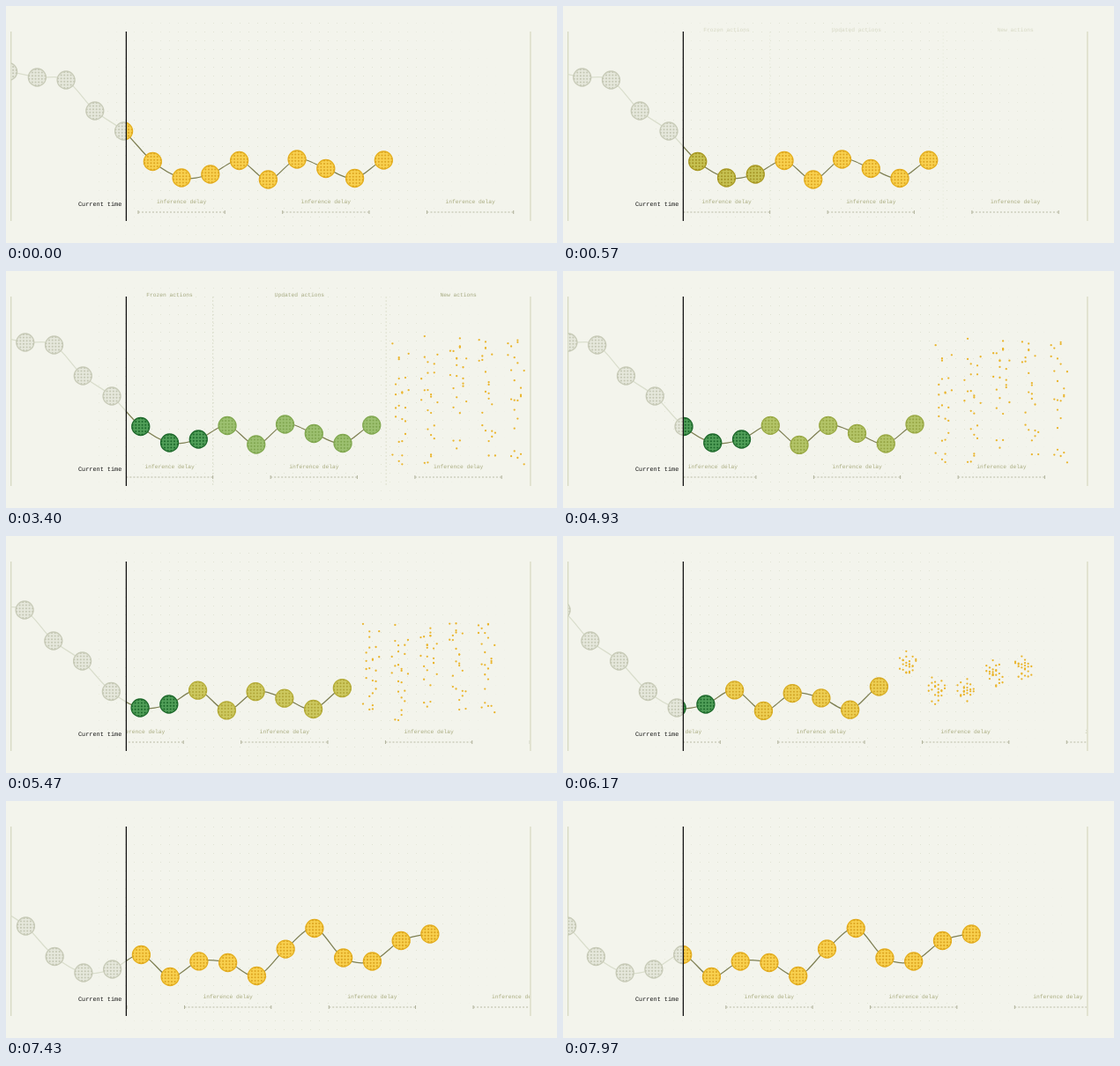
Animation of 625 by 269 pixels, one loop 8 s. Source, as an HTML page with a canvas:

```html
<!DOCTYPE html>
<html lang="en">
<head>
<meta charset="utf-8">
<title>Action chunk with inference delay</title>
<style>
  html, body { margin: 0; width: 100%; height: 100%; overflow: hidden; background: #f3f4ec; }
  canvas { display: block; }
</style>
</head>
<body>
<canvas id="stage" width="625" height="269"></canvas>
<script>
const ctx = document.getElementById('stage').getContext('2d');
const LOOP = 8000, PAUSE = 415, RESUME = 4450;
const LEFT = 5.7, NOW = 136.4, RIGHT = 594.9, TOP = 29, BOTTOM = 244;
const STEP = (RIGHT - NOW) / 14, RADIUS = 10, PITCH = 3.65;
const FONT = '"Liberation Mono", monospace';

// fill, outline, inner dots
const GREY = [[229, 231, 219], [201, 204, 185], [196, 199, 180]];
const YELLOW = [[248, 208, 79], [229, 176, 32], [222, 166, 34]];
const DARK = [[80, 158, 88], [32, 107, 45], [30, 106, 44]];
const LIGHT = [[156, 192, 112], [131, 170, 82], [128, 166, 80]];
const NOISE = [234, 181, 46];

// Action heights by group; updated actions drift to their revised heights
const past = [74.5, 81, 84, 119, 142];
const frozen = [176.5, 195, 191];
const updated = [175.5, 197, 174, 184.5, 195.5, 175];
const revised = [174.5, 199.5, 182, 183.5, 198.5, 168];
const fresh = [144.5, 178, 182, 158.5, 151];
const FIRST_UPDATED = past.length + frozen.length;
const FIRST_NEW = FIRST_UPDATED + updated.length;

const ramp = (t, from, to) => Math.min(1, Math.max(0, (t - from) / (to - from)));
const lerp = (a, b, k) => a + (b - a) * k;
const easeInOut = u => u < .5 ? 4 * u ** 3 : 1 - 4 * (1 - u) ** 3;
const mix = (a, b, k) => a.map((v, i) => lerp(v, b[i], k));
const blend = (a, b, k) => a.map((c, i) => mix(c, b[i], k));
const rgb = c => `rgb(${c.map(Math.round)})`;
const random = seed => {
  const v = Math.sin(seed * 12.9898) * 43758.5453;
  return v - Math.floor(v);
};

function line(x1, y1, x2, y2, color, width = 1, dash = []) {
  ctx.beginPath();
  ctx.setLineDash(dash);
  ctx.moveTo(x1, y1);
  ctx.lineTo(x2, y2);
  ctx.strokeStyle = color;
  ctx.lineWidth = width;
  ctx.stroke();
  ctx.setLineDash([]);
}

function label(text, x, y, color, size = 6.25, align = 'center') {
  ctx.font = `${size}px ${FONT}`;
  ctx.textRendering = 'geometricPrecision';
  ctx.textAlign = align;
  ctx.fillStyle = color;
  ctx.fillText(text, x, y);
}

function disc(x, y, r, color) {
  ctx.beginPath();
  ctx.arc(x, y, r, 0, 2 * Math.PI);
  ctx.fillStyle = color;
  ctx.fill();
}

function clipped(from, to, draw) {
  ctx.save();
  ctx.beginPath();
  ctx.rect(from, 0, to - from, 269);
  ctx.clip();
  draw();
  ctx.restore();
}

function backdrop() {
  for (let x = 105; x < 570; x += 10)
    for (let y = 19; y < 265; y += 10) {
      const fade = 1 - Math.hypot((x - 310) / 270, (y - 135) / 190);
      if (fade <= 0) continue;
      ctx.fillStyle = `rgba(205, 209, 185, ${Math.min(.5, fade * 1.3)})`;
      ctx.fillRect(x, y, 1, 1);
    }
}

// Calls visit(dx, dy, index) for the 24 inner dots of a node
function eachDot(visit) {
  let index = 0;
  [2, 4, 6, 6, 4, 2].forEach((count, col) => {
    for (let row = 0; row < count; row++)
      visit((col - 2.5) * PITCH, (row - (count - 1) / 2) * PITCH, index++);
  });
}

function body(x, y, [fill, edge]) {
  disc(x, y, RADIUS, rgb(fill));
  ctx.strokeStyle = rgb(edge);
  ctx.lineWidth = 1.3;
  ctx.stroke();
}

function node(x, y, colors) {
  body(x, y, colors);
  eachDot((dx, dy) => disc(x + dx, y + dy, 1.05, rgb(colors[2])));
}

// Catmull-Rom spline through the action heights
function curve(xAt, ys, color) {
  const slope = i => ((ys[i + 1] ?? ys[i]) - (ys[i - 1] ?? ys[i])) / 2;
  ctx.beginPath();
  ctx.moveTo(xAt(0), ys[0]);
  for (let i = 1; i < ys.length; i++)
    ctx.bezierCurveTo(xAt(i - 2 / 3), ys[i - 1] + slope(i - 1) / 3,
      xAt(i - 1 / 3), ys[i] - slope(i) / 3, xAt(i), ys[i]);
  ctx.strokeStyle = color;
  ctx.lineWidth = 1.25;
  ctx.stroke();
}

// Inner dots start at random heights and settle into a node
function newNode(t, k, x, y) {
  const settle = easeInOut(ramp(t, RESUME, RESUME + 2500));
  const solid = ramp(t, 6430, 7430);
  ctx.globalAlpha = solid;
  body(x, y, YELLOW);
  ctx.globalAlpha = ramp(t, 870 + k * 60, 1390 + k * 60);
  const color = rgb(mix(NOISE, YELLOW[2], solid));
  eachDot((dx, dy, index) => {
    const scattered = 74 + 146 * random(1 + k * 24 + index);
    disc(x + dx, lerp(scattered, y + dy, settle), 1.15, color);
  });
  ctx.globalAlpha = 1;
}

function delays(scroll) {
  for (let n = 0; n < 4; n++) {
    const x = NOW + STEP * (5 * n - scroll), end = x + 3 * STEP;
    label('inference delay', (x + end) / 2, 224, '#a9ab7f');
    line(x, 234, end, 234, '#b9bba6', 1, [2, 2]);
    for (const tick of [x, end]) line(tick, 232, tick, 236, '#b0b29b');
  }
}

function zones(alpha) {
  ctx.globalAlpha = alpha;
  const a = NOW + 3 * STEP, b = NOW + 9 * STEP;
  for (const x of [a, b]) line(x, TOP, x, BOTTOM, '#dcdfcd', 1, [2, 2]);
  label('Frozen actions', (NOW + a) / 2, 29, '#a3a77c');
  label('Updated actions', (a + b) / 2, 29, '#a3a77c');
  label('New actions', (b + RIGHT) / 2, 29, '#a3a77c');
  ctx.globalAlpha = 1;
}

function render(t) {
  const scroll = (Math.min(t, PAUSE) - PAUSE + Math.max(0, t - RESUME)) / 1000;
  const xAt = i => NOW + STEP * (i - 4.5 - scroll);
  const drift = ramp(t, RESUME, RESUME + 3000);
  const ys = [...past, ...frozen, ...mix(updated, revised, drift), ...fresh];
  const frozenColors = blend(YELLOW, DARK, ramp(t, 430, 900));
  const updatedColors = blend(YELLOW, LIGHT,
    ramp(t, 900, 1630) - ramp(t, RESUME, RESUME + 1950));

  ctx.fillStyle = '#f3f4ec';
  ctx.fillRect(0, 0, 625, 269);
  backdrop();
  line(LEFT, TOP, LEFT, BOTTOM, '#d3d6bf', 1.2);
  line(RIGHT, TOP, RIGHT, BOTTOM, '#d8dac3', 1.3);
  zones(ramp(t, 430, 830) - ramp(t, 3390, 3700));

  clipped(LEFT, NOW, () => {
    curve(xAt, ys, '#dadecd');
    ys.slice(0, FIRST_NEW).forEach((y, i) => node(xAt(i), y, GREY));
  });
  clipped(NOW, RIGHT - 1, () => {
    delays(scroll);
    const reveal = ramp(t, 6430, 7040);
    const linked = reveal ? ys : ys.slice(0, FIRST_NEW);
    clipped(NOW, xAt(FIRST_NEW - 1 + fresh.length * reveal),
      () => curve(xAt, linked, '#7f8054'));
    ys.forEach((y, i) => {
      if (i >= FIRST_NEW) newNode(t, i - FIRST_NEW, xAt(i), y);
      else if (i >= FIRST_UPDATED) node(xAt(i), y, updatedColors);
      else node(xAt(i), y, i >= past.length ? frozenColors : YELLOW);
    });
  });

  line(NOW, TOP, NOW, BOTTOM, '#111', 1.3);
  label('Current time', 131.3, 227.4, '#111', 6.85, 'right');
}

const start = performance.now();
function tick() {
  render((performance.now() - start) % LOOP);
  requestAnimationFrame(tick);
}
tick();
</script>
</body>
</html>
```
